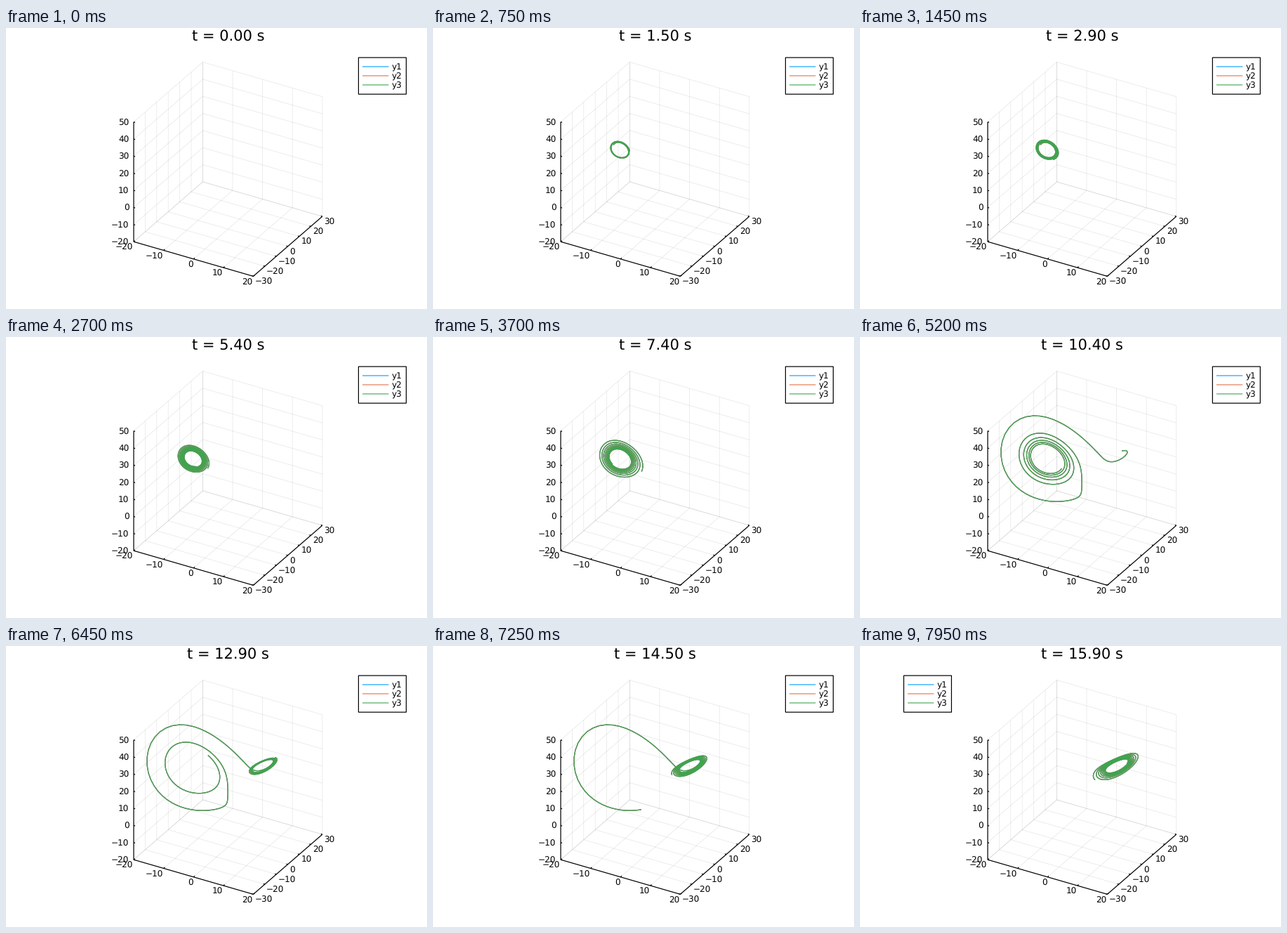
Animation of 600x400 px, one loop 8000 ms. Source, as a matplotlib script:

```python
import numpy as np
import matplotlib.pyplot as plt
from matplotlib.animation import FuncAnimation
from matplotlib.patches import Rectangle
from matplotlib.transforms import Affine2D

W, H, DPI = 600, 400, 100
FRAMES, INTERVAL = 160, 50
PX = 72 / DPI                     # points per pixel
COLORS = ["#009AFA", "#E36F47", "#3EA44E"]

# Data box and its orthographic projection to pixels
LO = np.array([-20.0, -30.0, -20.0])
HI = np.array([20.0, 30.0, 50.0])
CORNER = np.array([182.0, 304.2])
SIDE = 196.8
C30, S30 = np.cos(np.pi / 6), 0.5
EDGES = SIDE * np.array([[C30, S30 * S30], [S30, -C30 * S30], [0, -C30]])
TICKS = [np.arange(lo, hi + 1, 10) for lo, hi in zip(LO, HI)]

SUB = 10                          # integration steps per stored sample
DT = 0.01                         # stored sample spacing, seconds
STEP = 10                         # samples per frame
TRAIL = 500                       # samples kept in the trail
LEGEND_MOVE = 157                 # frame at which the legend changes side


def project(points):
    return CORNER + (np.asarray(points) - LO) / (HI - LO) @ EDGES


def lorenz(s):
    x, y, z = s
    return np.array([10 * (y - x), x * (28 - z) - y, x * y - 8 / 3 * z])


def solve(start, samples):
    h = DT / SUB
    s = np.array(start, float)
    out = [s]
    for _ in range(samples):
        for _ in range(SUB):
            a = lorenz(s)
            b = lorenz(s + h / 2 * a)
            c = lorenz(s + h / 2 * b)
            d = lorenz(s + h * c)
            s = s + h / 6 * (a + 2 * b + 2 * c + d)
        out.append(s)
    return np.array(out)


plt.rcParams["font.family"] = "DejaVu Sans"
plt.rcParams["text.hinting"] = "none"
plt.rcParams["path.snap"] = False

fig = plt.figure(figsize=(W / DPI, H / DPI), dpi=DPI, facecolor="white")
ax = fig.add_axes([0, 0, 1, 1])
ax.set_xlim(0, W)
ax.set_ylim(H, 0)
ax.axis("off")


def stroke(points, color="black", width=1.2, **kw):
    xs, ys = np.transpose(points)
    return ax.plot(xs, ys, color=color, lw=width * PX,
                   solid_capstyle="butt", solid_joinstyle="round", **kw)[0]


def label(x, y, text, size=12, **kw):
    return ax.text(x, y, text, fontsize=size * PX, va="baseline", **kw)


def tick_text(v):
    return f"{v:.0f}".replace("-", "\u2212")


def draw_grid():
    # each axis is ruled across the two back planes it belongs to
    back = np.array([LO[0], HI[1], LO[2]])
    for axis in range(3):
        for v in TICKS[axis]:
            for other in range(3):
                if other == axis:
                    continue
                a, b = back.copy(), back.copy()
                a[axis] = b[axis] = v
                a[other], b[other] = LO[other], HI[other]
                stroke(project([a, b]), width=0.7, alpha=0.1)


def draw_axis(axis, base, inward, dx, dy, ha):
    a, b = np.array(base, float), np.array(base, float)
    a[axis], b[axis] = LO[axis], HI[axis]
    stroke(project([a, b]))
    for v in TICKS[axis]:
        p = a.copy()
        p[axis] = v
        at = project(p)
        stroke([at, at + inward])
        label(at[0] + dx, at[1] + dy, tick_text(v), ha=ha)


draw_grid()
draw_axis(0, (0, LO[1], LO[2]), 0.018 * EDGES[1], -0.8, 12, "right")
draw_axis(1, (HI[0], 0, LO[2]), -0.012 * EDGES[0], 2.4, 11.7, "left")
draw_axis(2, (LO[0], LO[1], 0), 0.012 * EDGES[0], -6.6, 4.8, "right")

title = label(316.4, 18, "", size=21, ha="center")

path = project(solve((-10, -10, 30), (FRAMES - 1) * STEP))
trails = [stroke(path[:1], c) for c in COLORS]

# Legend, moved as one group
shift = Affine2D()
place = shift + ax.transData
ax.add_patch(Rectangle((502.4, 42.1), 68, 52.1, fc="white", ec="black",
                       lw=1.2 * PX, transform=place, zorder=4))
for i, c in enumerate(COLORS):
    y = 55 + 13 * i
    stroke([(508, y), (545.3, y)], c, 1.1, transform=place, zorder=5)
    label(549.7, y + 4.6, f"y{i + 1}", transform=place, zorder=5)


def update(k):
    end = k * STEP
    part = path[max(0, end - TRAIL):end + 1]
    for line in trails:
        line.set_data(part[:, 0], part[:, 1])
    title.set_text(f"t = {end * DT:.2f} s")
    shift.clear()
    if k >= LEGEND_MOVE:
        shift.translate(-440, 0)
    return trails + [title]


anim = FuncAnimation(fig, update, frames=FRAMES, interval=INTERVAL,
                     repeat=True, repeat_delay=0, blit=False)
plt.show()
```
